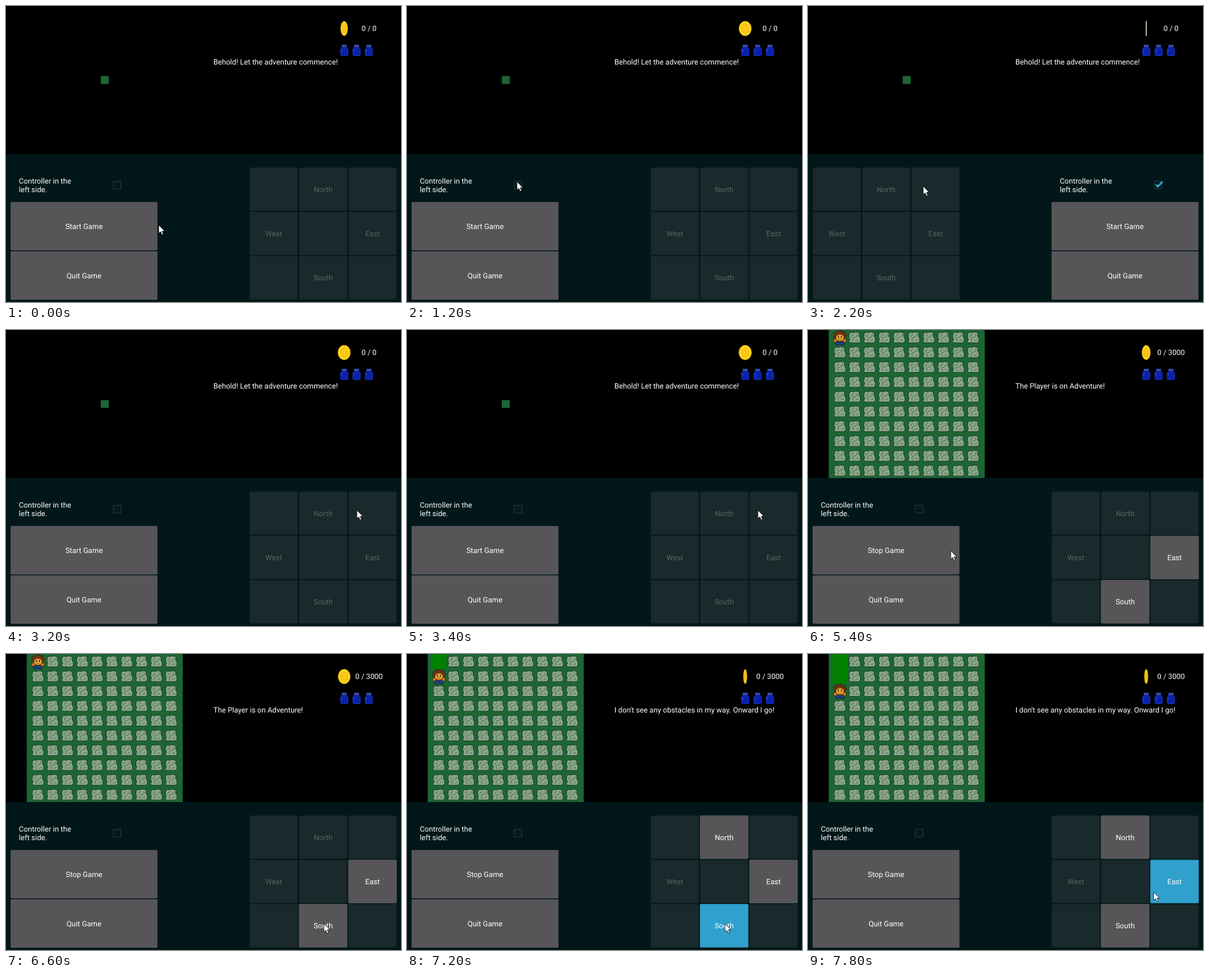
An HTML page for the animation above (8 s loop, 600x450 px).

```html
<!DOCTYPE html>
<html lang="en">
<head>
<meta charset="utf-8">
<title>Adventure</title>
<style>
html, body { margin: 0; width: 100%; height: 100%; overflow: hidden; background: #000; }
svg { display: block; width: 600px; height: 450px; }
text { font: 11.28px Roboto, sans-serif; fill: #fff; text-rendering: geometricPrecision; }
.mid { text-anchor: middle; }
.button rect { fill: #585558; stroke: #656366; stroke-width: .8; }
.button.off rect { fill: #1a2a2c; stroke: #162527; }
.button.off text { fill: #596465; }
.button.down rect { fill: #30a0cd; stroke: #34a6d4; }
</style>
</head>
<body>
<svg viewBox="0 0 600 450">
  <defs>
    <g id="rock">
      <path d="M3 6 5 3.500 10 4 12 3 17 3.500 18.500 6 18 9 20 13 20 18 17 19.500 3.500 19.500 2.500 17 4 14 2.500 11Z" fill="#8ba58b" stroke="#173d22" stroke-width=".9"/>
      <path d="M6 11 7 8 10 7M15 6 15.500 9 12 11 9 12 8 16 10 17.500M13 16 17 15" fill="none" stroke="#436a49" stroke-width=".9"/>
    </g>
    <g id="bottle">
      <path d="M2.500 0H10V3.500H2.500Z" fill="#3450b4"/>
      <path d="M2.500 4H10L12 6.500V15L11 16.500H1.500L.5 15V6.500Z" fill="#0a22ac" stroke="#1c37b4" stroke-width=".8"/>
      <path d="M2.500 7V10" stroke="#3f5cc6"/>
    </g>
  </defs>
  <rect width="600" height="450"/>
  <rect id="ground" fill="#1d6634"/>
  <rect id="trail" x="37" width="23" fill="#008000"/>
  <g id="rocks"></g>
  <g id="player">
    <path d="M1 14 5 13 7 16H15L17 13 21 14 20 18 16 19H6L2 18Z" fill="#d9801f" stroke="#33200f" stroke-width=".8"/>
    <path d="M6 17H16L18 21 15 23 11 21 7 23 4 21Z" fill="#203f86" stroke="#141a2c" stroke-width=".8"/>
    <path d="M1 10 3 7 1 5 5 4 6 1 9 2 13 0 14 3 19 2 18 5 22 8 19 11 17 12H5Z" fill="#6b3812" stroke="#2b1809" stroke-width=".8"/>
    <ellipse cx="11" cy="11.500" rx="6.300" ry="5.200" fill="#f2a52d" stroke="#492609" stroke-width=".8"/>
    <path d="M8 9H9.500V12H8ZM12.500 9H14V12H12.500Z" fill="#17214a"/>
    <path d="M9 14H13" stroke="#9c4818"/>
  </g>
  <g id="coin">
    <ellipse rx="9.500" ry="11" fill="#ffd71c" stroke="#f5bd08" stroke-width=".8"/>
    <ellipse rx="5.200" ry="7.200" fill="#ffcf18" stroke="#eea50a"/>
    <path d="M-1.500-4H1.500V4H-1.500Z" fill="#ffdd35" stroke="#eba70c" stroke-width=".7"/>
  </g>
  <rect id="edge" x="513" y="23" width="1.500" height="22.500" fill="#d5e6bd"/>
  <text id="score" class="mid" x="551.5" y="38"></text>
  <use href="#bottle" x="507.500" y="59"/>
  <use href="#bottle" x="526.300" y="59"/>
  <use href="#bottle" x="545" y="59"/>
  <text id="message" x="315" y="89"></text>
  <rect y="225" width="600" height="225" fill="#011719"/>
  <g id="menu">
    <text x="19.500" y="269.800">Controller in the</text>
    <text x="19.500" y="283.200">left side.</text>
    <rect id="box" x="163" y="266.500" width="11.500" height="11.500" fill="#03191b" stroke="#2a393c"/>
    <path id="tick" d="M165.500 271.500 168.500 274.500 175.500 267" fill="none" stroke="#32a4ce" stroke-width="2.700"/>
  </g>
  <g id="pad"></g>
  <path id="cursor" d="M0 0V12.500L2.800 10 4.900 14.700 7 13.700 5 9.300H9Z" fill="#fff" stroke="#000" stroke-width=".7"/>
</svg>
<script>
const $ = id => document.getElementById(id);
const NS = 'http://www.w3.org/2000/svg';
const CELL = 22.5, LOOP = 8000, STEP = 200, SIDE = 363;

function add(parent, tag, attrs, label = '') {
  const el = document.createElementNS(NS, tag);
  for (const key in attrs) el.setAttribute(key, attrs[key]);
  el.textContent = label;
  return parent.appendChild(el);
}

function addButton(parent, label, x, y, w, h) {
  const g = add(parent, 'g', { class: 'button off' });
  add(g, 'rect', { x: x + .4, y: y + .4, width: w - .8, height: h - .8, rx: .8 });
  add(g, 'text', { class: 'mid', x: x + w / 2, y: y + h / 2 + 4 }, label);
  return g;
}

const start = addButton($('menu'), 'Start Game', 7, 298, 223, 73.5);
const quit = addButton($('menu'), 'Quit Game', 7, 373, 223, 73.5);
const pad = ['', 'North', '', 'West', '', 'East', '', 'South', ''].map((label, i) =>
  addButton($('pad'), label, 7 + i % 3 * 75, 245.5 + Math.floor(i / 3) * 67.3, 73.5, 66));
const [, north, , , , east, , south] = pad;

const rocks = Array.from({ length: 100 }, (_, i) => add($('rocks'), 'use', {
  href: '#rock', x: 37 + i % 10 * CELL + .2, y: Math.floor(i / 10) * CELL
}));

// time, x, y
const path = [
  [0, 232, 333], [200, 232, 333], [1000, 167, 267], [2000, 167, 267],
  [2200, 175, 274], [2800, 533, 274], [3600, 533, 274], [4400, 181, 339],
  [4800, 186, 327], [5200, 186, 327], [6200, 483, 410], [7400, 483, 410], [7800, 525, 362]
];

function cursorAt(t) {
  const i = path.findIndex(p => p[0] > t);
  if (i < 0) return path[path.length - 1].slice(1);
  const [a, b] = [path[i - 1], path[i]];
  const k = smooth((t - a[0]) / (b[0] - a[0]));
  return [1, 2].map(n => a[n] + (b[n] - a[n]) * k);
}

const smooth = k => k * k * (3 - 2 * k);
const during = (t, from, to) => t >= from && t < to;
const show = (el, on) => el.style.display = on ? '' : 'none';
const move = (el, x, y = 0) => el.setAttribute('transform', `translate(${x} ${y})`);

function setButton(el, enabled, down = false) {
  el.setAttribute('class', 'button' + (down ? ' down' : enabled ? '' : ' off'));
}

function render(t) {
  const playing = t >= 5200;
  const row = t >= 7400 ? 2 : t >= 7000 ? 1 : 0;
  const swapped = during(t, 1600, 3000);

  const size = playing ? 237 : 12;
  const ground = { x: 150 - size / 2, y: 112.5 - size / 2, width: size, height: size };
  for (const key in ground) $('ground').setAttribute(key, ground[key]);
  $('trail').setAttribute('height', playing ? row * CELL : 0);
  show($('rocks'), playing);
  show($('player'), playing);
  rocks.forEach((rock, i) => show(rock, i % 10 || i / 10 > row));
  move($('player'), 37.5, row * CELL + .3);

  const turn = smooth(Math.abs(Math.sin(Math.PI * (t - 4840) / 2660)));
  show($('coin'), turn > .08);
  show($('edge'), turn <= .08);
  $('coin').setAttribute('transform', `translate(513.7 34.3) scale(${turn} 1)`);

  $('score').textContent = playing ? '0 / 3000' : '0 / 0';
  $('message').textContent = row ? "I don't see any obstacles in my way. Onward I go!"
    : playing ? 'The Player is on Adventure!' : 'Behold! Let the adventure commence!';

  move($('menu'), swapped ? SIDE : 0);
  move($('pad'), swapped ? 0 : SIDE);
  show($('tick'), swapped);
  start.lastChild.textContent = playing ? 'Stop Game' : 'Start Game';
  setButton(start, true, during(t, 5000, 5200));
  setButton(quit, true);
  setButton(north, row > 0);
  setButton(east, playing, t >= 7800);
  setButton(south, playing, during(t, 6800, 7000) || during(t, 7200, 7400));
  move($('cursor'), ...cursorAt(t));
}

function tick() {
  render(Math.floor(performance.now() % LOOP / STEP) * STEP);
  requestAnimationFrame(tick);
}
tick();
</script>
</body>
</html>
```
